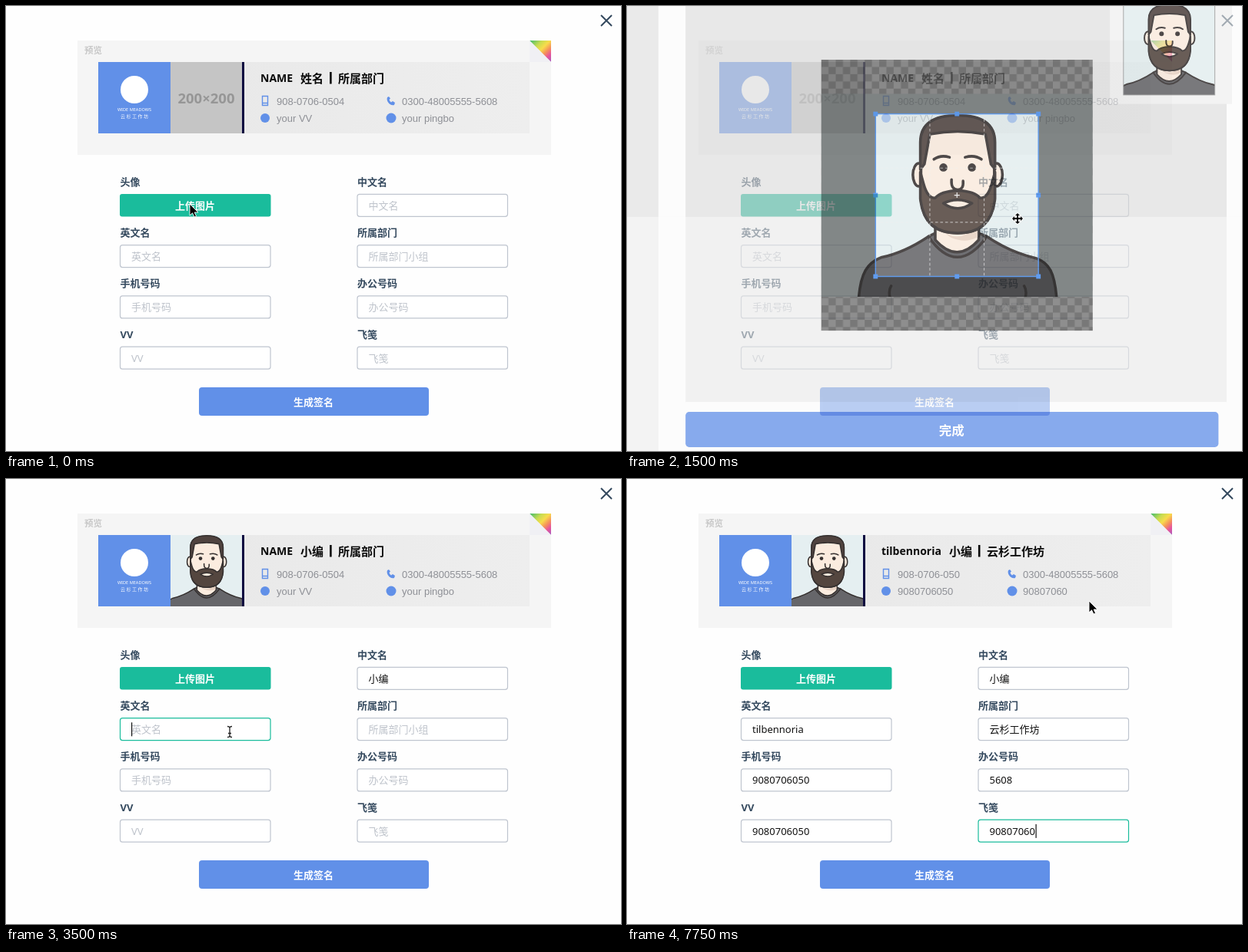
Write an HTML page that moves like this. It is 800 px wide and 580 px high and loops after 8 s.

```html
<!DOCTYPE html>
<html lang="zh-CN">
<head>
<meta charset="utf-8">
<title>签名生成</title>
<style>
  html, body { margin: 0; width: 100%; height: 100%; overflow: hidden; background: #fefefe; }
  svg { display: block; }
  text { font-family: "Noto Sans", "Noto Sans CJK SC", sans-serif; white-space: pre; }
  .mac { font-family: Inter, "Noto Sans CJK SC", sans-serif; }
  .arial { font-family: "Liberation Sans", "Noto Sans CJK SC", sans-serif; }
  .bold { font-weight: bold; }
  .mid { text-anchor: middle; }
  .end { text-anchor: end; }
  .blend { mix-blend-mode: multiply; }
</style>
</head>
<body>
<svg width="800" height="580" viewBox="0 0 800 580">
  <defs>
    <g id="man" stroke="#35302f" stroke-width="4" stroke-linejoin="round" stroke-linecap="round">
      <path d="M0 0H400V300H0Z" fill="#e5eff1" stroke="none"/>
      <path d="M55 304C58 264 68 250 88 242Q122 235 158 211H244Q280 235 316 243C336 250 344 264 347 304Z" fill="#66666a"/>
      <path d="M101 300Q99 290 103 284M301 300Q303 290 299 284" fill="none"/>
      <path d="M158 211Q200 272 244 211L232 206H168Z" fill="#5b5b5f"/>
      <path d="M168 180V216Q200 252 232 216V180Z" fill="#fbecdf"/>
      <path d="M170 196Q200 226 230 196L230 212Q212 222 190 212Z" fill="#e8d3c4" stroke="none"/>
      <ellipse cx="144" cy="120" rx="9" ry="17" fill="#fbecdf"/>
      <ellipse cx="258" cy="120" rx="9" ry="17" fill="#fbecdf"/>
      <path d="M147 70V150Q148 206 201 206Q254 206 255 150V70Q255 33 201 33Q147 33 147 70Z" fill="#fbecdf"/>
      <path d="M146 112V72Q146 32 201 32Q256 32 256 72V112L250 104L242 60Q201 52 160 60L152 104Z" fill="#50433f"/>
      <path d="M146 116L151 134Q157 155 168 154Q176 144 201 143Q226 144 234 154Q245 155 251 134L256 116V155Q251 206 201 206Q151 206 146 155Z" fill="#54463f"/>
      <path d="M180 162Q201 152 222 162Q201 177 180 162Z" fill="#fbecdf"/>
      <path d="M166 97Q176 90 189 94M212 94Q226 90 236 97M192 127Q191 142 201 142Q210 142 209 129" fill="none"/>
      <g fill="#35302f" stroke="none"><circle cx="180" cy="109" r="6"/><circle cx="222" cy="109" r="6"/></g>
    </g>
    <linearGradient id="rainbow" x1="0" y1="0" x2="1" y2="1">
      <stop offset=".05" stop-color="#52c06a"/><stop offset=".3" stop-color="#c9dc50"/>
      <stop offset=".48" stop-color="#f8dc4c"/><stop offset=".65" stop-color="#f5925a"/>
      <stop offset=".8" stop-color="#e8559b"/><stop offset="1" stop-color="#a55cc0"/>
    </linearGradient>
    <linearGradient id="side" x1="0" y1="0" x2="1" y2="1">
      <stop offset="0" stop-color="#ebebeb"/><stop offset=".5" stop-color="#e1e6ec"/><stop offset="1" stop-color="#e2eeea"/>
    </linearGradient>
    <linearGradient id="card"><stop offset="0" stop-color="#e7e7e7"/><stop offset="1" stop-color="#eeeeee"/></linearGradient>
    <pattern id="checker" width="16" height="16" patternUnits="userSpaceOnUse" x="278" y="101">
      <path d="M0 0H16V16H0Z" fill="#fff"/><path d="M0 0H8V8H0ZM8 8H16V16H8Z" fill="#ccc"/>
    </pattern>
    <clipPath id="sideClip"><path d="M71 -5H251V273H71Z"/></clipPath>
    <filter id="shadow" x="-10%" y="-10%" width="120%" height="120%">
      <feDropShadow dx="0" dy="5" stdDeviation="5" flood-opacity=".4"/>
    </filter>
  </defs>
  <g id="stage"></g>
</svg>
<script>
const LOOP = 8000, STEP = 250;
const BLUE = '#6190e8', TEAL = '#1abc9c', INK = '#34495e', GREY = '#8e9096';
const stage = document.getElementById('stage');
const pen = document.createElement('canvas').getContext('2d');

const rect = (x, y, w, h, fill, more = '') =>
  `<rect x="${x}" y="${y}" width="${w}" height="${h}" fill="${fill}" ${more}/>`;
const path = (d, more) => `<path d="${d}" ${more}/>`;
const dot = (x, y, r, fill) => `<circle cx="${x}" cy="${y}" r="${r}" fill="${fill}"/>`;
// cy is the vertical middle of the glyphs
const text = (x, cy, s, size, fill, cls = '') =>
  `<text x="${x}" y="${cy + size * .37}" font-size="${size}" fill="${fill}" class="${cls}">${s}</text>`;
const man = (x, y, w, h, box) =>
  `<svg x="${x}" y="${y}" width="${w}" height="${h}" viewBox="${box}"><use href="#man"/></svg>`;
const FULL = '0 0 400 300', CROP = '80 30 240 240';

function width(s, font) {
  pen.font = font + ' "Noto Sans", "Noto Sans CJK SC", sans-serif';
  return pen.measureText(s).width;
}

// column x, row, label, placeholder, value, step of focus, step of typing
const fields = [
  [457, 0, '中文名', '中文名', '小编', 11, 13],
  [148.5, 1, '英文名', '英文名', 'tilbennoria', 14, 16],
  [457, 1, '所属部门', '所属部门小组', '云杉工作坊', 19, 20],
  [148.5, 2, '手机号码', '手机号码', '9080706050', 22, 23],
  [457, 2, '办公号码', '办公号码', '5608', 24, 26],
  [148.5, 3, 'VV', 'VV', '9080706050', 27, 29],
  [457, 3, '飞笺', '飞笺', '90807060', 30, 31]
];
const typed = (i, n) => n >= fields[i][6];

function field(i, n) {
  const [x, row, label, hint, value, focus] = fields[i];
  const end = i + 1 < fields.length ? fields[i + 1][5] : 32;
  const on = n >= focus && n < end, full = typed(i, n), cy = 260 + row * 66.3;
  const caret = on && n != 18 && n != 21;
  const cx = x + 14.5 + (full ? width(value, '13px') + .5 : 0);
  return text(x, cy - 31, label, 13, INK, 'bold') +
    rect(x, cy - 14.7, 195.5, 29, '#fff', `rx="3" stroke="${on ? TEAL : '#bfc5cf'}" stroke-width="1.2"`) +
    text(x + 14.5, cy, full ? value : hint, 13, full ? '#111' : '#bec3cb') +
    (caret ? rect(cx, cy - 9, 1.2, 18, '#111') : '');
}

function header(n) {
  const name = typed(1, n) ? fields[1][4] : 'NAME';
  const x = 341 + width(name, 'bold 14px');
  return rect(93, 45, 616, 149, '#f5f5f5') +
    path('M681 45H709V73Z', 'fill="url(#rainbow)"') +
    path('M681 45V73H709Z', 'fill="#f0f0f4"') +
    text(102, 57.5, '预览', 11.5, '#c8c8c8', 'bold') +
    rect(120, 73, 561, 93, 'url(#card)') + rect(120, 73, 94, 93, BLUE) +
    dot(167, 109, 18, '#fff') +
    text(167, 134.5, 'WIDE MEADOWS', 5.6, '#fff', 'mid') +
    text(167, 143.5, '云 杉 工 作 坊', 6, '#fff', 'mid') +
    (n >= 10 ? man(214, 73, 93.5, 93, CROP) :
      rect(214, 73, 93, 93, '#c5c5c5') + text(260.5, 120.5, '200×200', 18.5, '#969696', 'bold mid')) +
    rect(307, 73, 3, 93, '#0b0840') +
    text(331, 94, name, 14, '#0a0a0a', 'bold') +
    text(x, 94, typed(0, n) ? '小编' : '姓名', 15, '#0a0a0a', 'bold') +
    rect(x + 38, 86, 2.6, 15.5, '#0a0a0a') +
    text(x + 49, 94, typed(2, n) ? fields[2][4] : '所属部门', 15, '#0a0a0a', 'bold') +
    path('M333.5 117.5H340.5V129.5H333.5ZM333.5 126.5H340.5', `fill="none" stroke="${BLUE}" stroke-width="1.4"`) +
    path('M496 119C494 124 500 131 505 129L506 126L503 124L501 125.5Q499 124 498.5 122L500 120.5L498 118Z', `fill="${BLUE}"`) +
    dot(337, 146, 6, BLUE) + dot(501, 146, 6.5, BLUE) +
    text(352, 124, typed(3, n) ? '908-0706-050' : '908-0706-0504', 13, GREY, 'arial') +
    text(515, 124, '0300-48005555-5608', 13, GREY, 'arial') +
    text(352, 146, typed(5, n) ? fields[5][4] : 'your VV', 13, GREY, 'arial') +
    text(515, 146, typed(6, n) ? fields[6][4] : 'your pingbo', 13, GREY, 'arial');
}

const form = (n, alpha = 1) => rect(0, 0, 800, 580, '#fefefe') + `<g opacity="${alpha}">` +
  path('M774 12L788 26M788 12L774 26', `stroke="${INK}" stroke-width="2"`) +
  header(n) +
  text(148.5, 229, '头像', 13, INK, 'bold') +
  rect(148, 245, 196.5, 29.5, TEAL, 'rx="3"') + text(246, 260, '上传图片', 13, '#fff', 'bold mid') +
  fields.map((f, i) => field(i, n)).join('') +
  rect(251, 497, 299, 37, BLUE, 'rx="4"') + text(400, 516, '生成签名', 13, '#fff', 'bold mid') + '</g>';

const folder = 'M-8 -5H-2L0 -3H8V6H-8ZM-8 -1H8';
const places = ['青禾云同步盘', 'Nimbo Locker', '应用程序', '桌面', 'sunrourou',
  'h5', 'wx', 'wxsq_base', 'jingzhi', 'slices', 'bundle'];
function place(s, i) {
  const cy = 34.5 + i * 24.35;
  const icon = i == 1 || i == 2 ? dot(0, 0, 6.5, '#85878a') :
    path(i == 3 ? 'M-8 -6H8V6H-8ZM-8 -3H8M-8 3H8' :
      i == 4 ? 'M-8 0L0 -7L8 0M-5.5 -1V7H5.5V-1M-1.5 7V2H1.5V7' : folder,
      'fill="#bfc1c4" stroke="#77797c" stroke-width="1.2"');
  return `<g transform="translate(97 ${cy})">${icon}</g>` + text(111, cy, s, 12.6, '#2a2a2a', 'mac');
}

function button(x, s, fill) {
  return rect(x, 347, 68, 20, fill, 'rx="4" stroke="#d2d2d2" stroke-width=".8"') +
    text(x + 34, 357, s, 12.5, '#222', 'mac mid');
}

function sheet(dy) {
  const info = [['创建时间', '今天 下午5:23'], ['修改时间', '今天 下午5:23'], ['上次打开时间', '今天 下午5:23'], ['尺寸', '800 × 600']];
  return `<g transform="translate(0 ${dy})">` +
    rect(71, -40, 658, 416, '#e9e9e9', 'filter="url(#shadow)"') +
    rect(71, -5, 180, 278, 'url(#side)') + rect(251, -5, 478, 278.5, '#fff') +
    rect(251, -5, 1, 278, '#d0d0d0') + rect(442.5, -5, 1, 278, '#d8d8d8') +
    rect(252, -5, 190.5, 26, '#f7f7f7') + rect(252, 20.5, 190.5, 1, '#d0d0d0') +
    rect(71, 339, 658, 37, '#e4e4e4') +
    `<g clip-path="url(#sideClip)">${places.map(place).join('')}</g>` +
    text(80, 13, '个人收藏', 10.3, '#7b7d80', 'mac bold') +
    text(258, 10.5, '今天', 10.3, '#333', 'mac bold') +
    rect(252, 41, 190.5, 16.5, '#1467d9') +
    dot(265, 32.5, 6.5, BLUE) + man(258, 43.5, 14, 11, FULL) +
    text(278, 32.5, 'O2-logo.png', 11.3, '#222', 'mac') +
    text(278, 49.5, 'selfportrait.png', 11.3, '#fff', 'mac') +
    man(525, 10, 121.5, 91, FULL) + rect(525, 10, 121.5, 91, 'none', 'stroke="#9aa3a6"') +
    text(585.5, 121, 'selfportrait.png', 15.3, '#111', 'mac mid') +
    text(563, 157.5, 'PNG 图像－31 KB', 11, '#8a8a8a', 'mac bold') +
    info.map(([k, v], i) => text(555, 174 + i * 16, k, 11.2, '#858585', 'mac end') +
      text(563, 174 + i * 16, v, 11.4, '#111', 'mac')).join('') +
    text(563, 238, '添加标记...', 11.2, '#1a7fe8', 'mac') +
    text(270, 308, '格式：', 12.5, '#222', 'mac bold') +
    rect(313.5, 299, 215, 19, '#fff', 'rx="3" stroke="#cfcfcf"') +
    rect(513, 298.5, 16, 20, '#2f7cf0', 'rx="3"') +
    path('M518 306L521 303L524 306M518 311L521 314L524 311', 'fill="none" stroke="#fff" stroke-width="1.4"') +
    text(321, 308.5, '所有文件', 12.3, '#222', 'mac') +
    button(80, '选项', '#fff') + button(578.5, '取消', '#fff') + button(653, '打开', '#d9d9dc') + '</g>';
}

function cropper(scale, alpha, veilY, veil) {
  let grips = '';
  for (let i = 0; i < 9; i++)
    if (i != 4) grips += rect(335.5 + i % 3 * 90, 158.5 + (i / 3 | 0) * 90, 5, 5, '#4a90f0');
  return `<g class="blend" opacity="${alpha}" transform="translate(421 276) scale(${scale}) translate(-421 -276)">` +
    rect(-100, -100, 1100, 800, '#e9e9e9') +
    rect(98, 9, 653, 551, '#fdfdfd') +
    rect(128, 39, 598, 441, '#e6e6e6') +
    rect(0, veilY, 900, 400, '#fdfdfd', `opacity="${veil}"`) +
    rect(597, 9, 135, 141, '#f3f3f3') + man(612, 39, 101, 101, CROP) +
    rect(612, 39, 101, 101, 'none', 'stroke="#999" stroke-width=".8"') +
    rect(278, 101, 300, 300, 'url(#checker)') + man(278, 138.5, 300, 225, FULL) +
    rect(278, 101, 300, 300, '#000', 'opacity=".5"') + man(338, 161, 180, 180, CROP) +
    path('M398 161V341M458 161V341M338 221H518M338 281H518', 'stroke="#eee" stroke-dasharray="3 2.5" opacity=".6"') +
    path('M425 251H431M428 248V254', 'stroke="#eee"') +
    rect(338, 161, 180, 180, 'none', 'stroke="#4a90f0" stroke-width="1.2"') + grips +
    rect(128, 491, 589, 39, '#789fec', 'rx="4"') + text(422, 511, '完成', 14, '#fff', 'bold mid') + '</g>';
}

const shapes = {
  arrow: path('M0 0V15L3.5 11.8L6 17L8.5 16L6.2 11H11Z', 'fill="#000" stroke="#fff" stroke-width=".9"'),
  beam: path('M-3 -7Q0 -7 0 -5Q0 -7 3 -7M0 -5V5M-3 7Q0 7 0 5Q0 7 3 7M-2 2H2', 'fill="none" stroke="#222" stroke-width="1.3"'),
  move: path('M0 -7L3 -4H1V-1H4V-3L7 0L4 3V1H1V4H3L0 7L-3 4H-1V1H-4V3L-7 0L-4 -3V-1H-1V-4H-3Z', 'fill="#000" stroke="#fff" stroke-width="1.6" paint-order="stroke"')
};
// first step, shape, x, y
const moves = [
  [0, 'arrow', 239, 258], [3, 'arrow', 671, 346], [6, 'move', 508, 277], [7, 'move', 486, 266],
  [8, 'move', 519, 356], [9, 'arrow', 508, 486], [11, 'beam', 540, 268], [13],
  [14, 'beam', 291, 329.5], [16], [18, 'beam', 583, 329], [20, 'arrow', 525, 350],
  [21, 'arrow', 399, 372], [22, 'beam', 300, 398], [23], [24, 'beam', 519, 398], [26],
  [27, 'beam', 300, 464], [29], [30, 'beam', 490, 463], [31, 'arrow', 601, 159]
];
function cursor(n) {
  const [, shape, x, y] = moves.filter(m => m[0] <= n).pop();
  return shape ? `<g transform="translate(${x} ${y})">${shapes[shape]}</g>` : '';
}

function view(n) {
  if (n == 3) return form(n) + sheet(0);
  if (n == 4) return form(n) + sheet(-29);
  if (n == 6) return form(n, .42) + cropper(1.177, .88, 275, .5);
  if (n > 6 && n < 10) return form(n, 0) + cropper(1, 1, 600, 0);
  if (n == 10) return form(n, .5) + cropper(1.257, .88, 424, .9);
  return form(n);
}

let shown = -1;
function tick(now) {
  const n = Math.floor(now % LOOP / STEP);
  if (n != shown) {
    shown = n;
    stage.innerHTML = view(n) + cursor(n);
  }
  requestAnimationFrame(tick);
}
tick(0);
</script>
</body>
</html>
```
